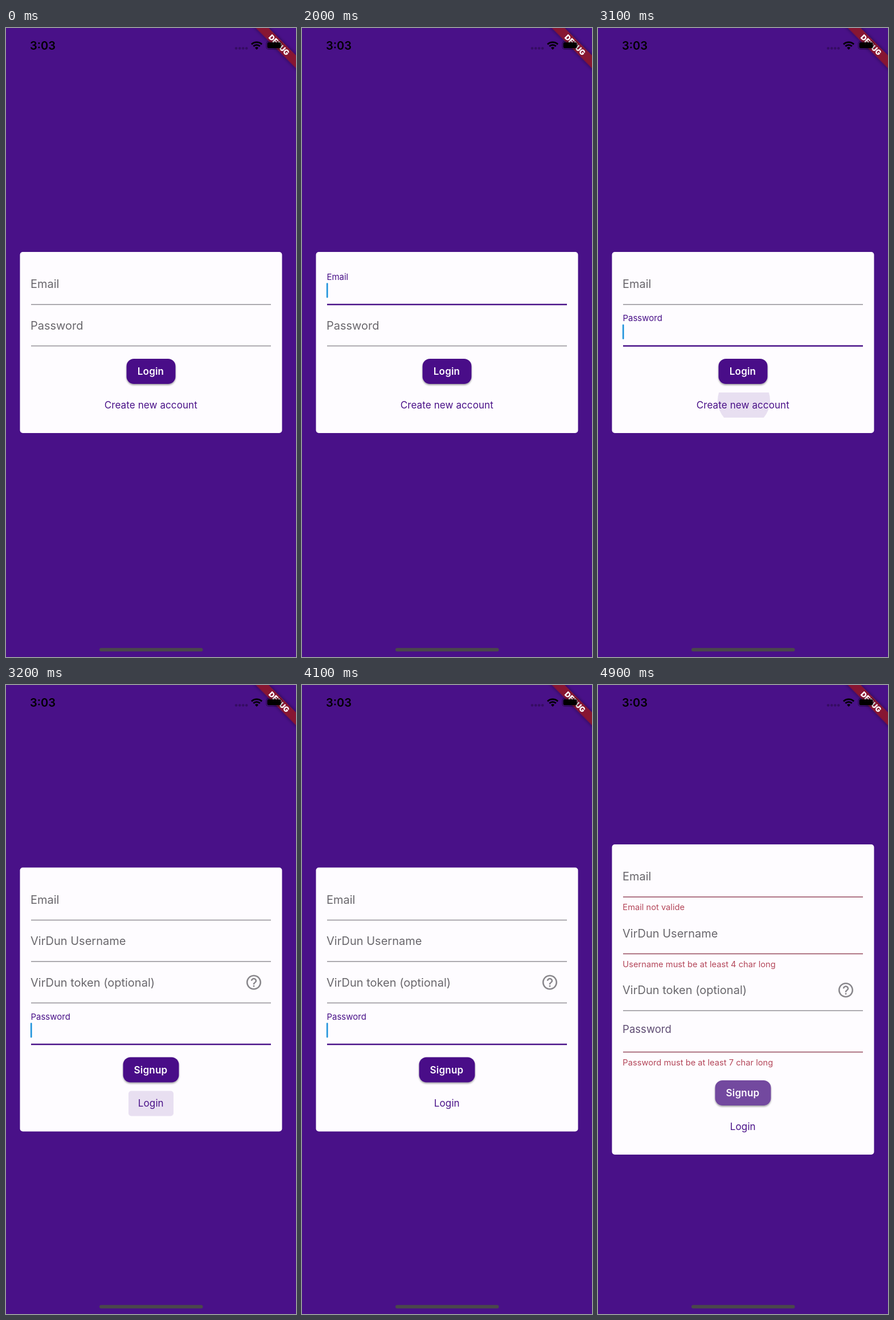
Write an HTML page that moves like this. It is 509 px wide and 1101 px high and loops after 5 s.

```html
<!DOCTYPE html>
<html lang="en">
<head>
<meta charset="utf-8">
<title>Login form</title>
<style>
  html, body { margin: 0; width: 100%; height: 100%; overflow: hidden; background: #491188; }
  svg { display: block; width: 100%; height: 100%; }
  text { font-family: Inter, "Open Sans", sans-serif; }
  .label { font-size: 20px; }
  .button { font-size: 17px; font-weight: 600; letter-spacing: .2px; text-anchor: middle; fill: #fefcff; }
  .link { font-size: 17px; letter-spacing: .1px; text-anchor: middle; fill: #491188; }
  .error { font-size: 14.7px; fill: #b4475a; }
</style>
</head>
<body>
<svg viewBox="0 0 509 1101">
  <defs>
    <filter id="drop" x="-20%" y="-20%" width="140%" height="160%">
      <feDropShadow dx="0" dy="2" stdDeviation="1.6" flood-color="#000" flood-opacity=".38"/>
    </filter>
    <filter id="glow" x="-20%" y="-100%" width="140%" height="300%">
      <feDropShadow dx="0" dy="0" stdDeviation="3" flood-color="#000" flood-opacity=".5"/>
    </filter>
    <clipPath id="linkClip"><rect x="160" y="638" width="189" height="44" rx="5"/></clipPath>
    <clipPath id="buttonClip"><rect x="205.5" y="651.5" width="98" height="44" rx="13"/></clipPath>
  </defs>
  <rect width="509" height="1101" fill="#491188"/>
  <g id="form"></g>

  <g transform="translate(509 0) rotate(45)">
    <rect x="-60" y="34" width="120" height="15.7" fill="#871333" filter="url(#glow)"/>
    <text y="46.6" font-size="13" font-weight="900" fill="#fff" text-anchor="middle">DEBUG</text>
  </g>

  <text x="42" y="37.8" font-size="20" font-weight="600">3:03</text>
  <g fill="#000" fill-opacity=".27">
    <circle cx="404" cy="35.5" r="2.3"/><circle cx="410.2" cy="35.5" r="2.3"/>
    <circle cx="416.2" cy="35.5" r="2.3"/><circle cx="422.2" cy="35.5" r="2.3"/>
  </g>
  <g fill="none" stroke="#000" stroke-width="2.9">
    <path d="M431 28.6A12.8 12.8 0 0 1 449 28.6"/>
    <path d="M434.3 32A8 8 0 0 1 445.7 32"/>
    <path d="M440 38L437 34.8A4.3 4.3 0 0 1 443 34.8Z" fill="#000" stroke="none"/>
  </g>
  <rect x="456.8" y="23.3" width="27.6" height="14" rx="4.3" fill="none" stroke="#000" stroke-opacity=".4" stroke-width="1.2"/>
  <rect x="458.5" y="25" width="24.2" height="10.6" rx="2.8"/>
  <path d="M486 28Q488.4 30.3 486 32.7Z" fill-opacity=".4"/>
  <rect x="164" y="1085.3" width="181.5" height="6" rx="3" fill="#4a484b"/>
</svg>
<script>
const LOOP = 5000, STEP = 100;
const PURPLE = [73, 17, 136], LABEL = [105, 103, 108], LINE = [146, 144, 150];
const ERROR_LINE = 'rgb(148,72,92)';
const HELP = 'M11 18h2v-2h-2v2zm1-16C6.48 2 2 6.48 2 12s4.48 10 10 10 10-4.48 10-10S17.52 2 12 2z' +
  'm0 18c-4.41 0-8-3.59-8-8s3.59-8 8-8 8 3.59 8 8-3.59 8-8 8z' +
  'm0-14c-2.21 0-4 1.79-4 4h2c0-1.1.9-2 2-2s2 .9 2 2c0 2-3 1.75-3 5h2c0-2.25 3-2.5 3-5 0-2.21-1.79-4-4-4z';

// Key moments in ms
const EMAIL_FOCUS = 1810, PASSWORD_FOCUS = 2720, TAP_CREATE = 3100,
  SIGNUP = 3200, TAP_SIGNUP = 4800, SUBMIT = 4810;

const form = document.getElementById('form');
const clamp = x => Math.min(1, Math.max(0, x));
const lerp = (a, b, k) => a + (b - a) * k;
const mix = (a, b, k) => `rgb(${a.map((v, i) => Math.round(lerp(v, b[i], k)))})`;

// Fast-out, slow-in curve: cubic-bezier(.4, 0, .2, 1)
function ease(x) {
  if (x <= 0 || x >= 1) return clamp(x);
  let lo = 0, hi = 1;
  for (let i = 0; i < 20; i++) {
    const s = (lo + hi) / 2, r = 1 - s;
    if (1.2 * r * r * s + .6 * r * s * s + s ** 3 < x) lo = s; else hi = s;
  }
  return 3 * (1 - lo) * lo * lo + lo ** 3;
}

const focusLevel = (t, from, to) => ease((t - from) / 200) - ease((t - to) / 200);

// Caret holds for 650 ms, then fades out and in every 500 ms
function caretOpacity(t, from, to) {
  if (t < from || t >= to) return 0;
  const age = t - from - 650;
  if (age < 0) return 1;
  const k = 1 - (1 - clamp(age % 500 / 250)) ** 1.7;
  return Math.floor(age / 500) % 2 ? k : 1 - k;
}

function field(name, y, { focus = 0, caret = 0, error = '', help = false } = {}) {
  const width = error ? 1.6 : lerp(1.3, 2.7, focus);
  const stroke = error ? ERROR_LINE : mix(LINE, PURPLE, focus);
  let out = `<text class="label" fill="${mix(LABEL, PURPLE, focus)}"
    transform="translate(${lerp(43, 43.4, focus)} ${y - lerp(29, 43.2, focus)}) scale(${lerp(1, .75, focus)})">${name}</text>
    <path d="M44 ${y}H465" stroke="${stroke}" stroke-width="${width}"/>`;
  if (caret) out += `<rect x="42.9" y="${y - 37.8}" width="2.7" height="26.2" rx="1.3" fill="#2094dc" opacity="${caret}"/>`;
  if (error) out += `<text class="error" x="43.3" y="${y + 23}">${error}</text>`;
  if (help) out += `<path transform="translate(419.3 ${y - 51.7}) scale(1.305)" fill="#89878c" d="${HELP}"/>`;
  return out;
}

const card = (top, bottom) =>
  `<rect x="24.5" y="${top}" width="460" height="${bottom - top}" rx="5" fill="#fefcff"/>`;

const button = (name, y, width, color = '#491188') =>
  `<rect x="${254.5 - width / 2}" y="${y}" width="${width}" height="44" rx="13" fill="${color}" filter="url(#drop)"/>`;

const buttonText = (name, y) => `<text class="button" x="254" y="${y + 28}">${name}</text>`;
const linkText = (name, y) => `<text class="link" x="254.3" y="${y + 27.6}">${name}</text>`;

function loginForm(t) {
  const ripple = t >= TAP_CREATE
    ? '<circle cx="256" cy="652" r="46" fill="#491188" opacity=".12" clip-path="url(#linkClip)"/>' : '';
  return card(392, 709) +
    field('Email', 484, {
      focus: focusLevel(t, EMAIL_FOCUS, PASSWORD_FOCUS),
      caret: caretOpacity(t, EMAIL_FOCUS, PASSWORD_FOCUS)
    }) +
    field('Password', 556.5, {
      focus: focusLevel(t, PASSWORD_FOCUS, SUBMIT),
      caret: caretOpacity(t, PASSWORD_FOCUS, SUBMIT)
    }) +
    button('Login', 579, 86) + buttonText('Login', 579) +
    ripple + linkText('Create new account', 638);
}

function signupForm(t) {
  const bad = t >= SUBMIT;
  const lines = bad ? [371, 470.5, 570, 642.5] : [411.5, 484, 556.5, 629];
  const top = bad ? 692 : 651.5, link = top + 59;
  const glow = .12 * clamp(1 - (t - SIGNUP) / 375) ** 1.2;
  const ripple = t >= TAP_SIGNUP && !bad
    ? '<circle cx="254.5" cy="673.5" r="27" fill="#fff" opacity=".22" clip-path="url(#buttonClip)"/>' : '';
  return (bad ? card(279, 822) : card(319.5, 781.5)) +
    field('Email', lines[0], { error: bad && 'Email not valide' }) +
    field('VirDun Username', lines[1], { error: bad && 'Username must be at least 4 char long' }) +
    field('VirDun token (optional)', lines[2], { help: true }) +
    field('Password', lines[3], {
      focus: focusLevel(t, PASSWORD_FOCUS, SUBMIT),
      caret: caretOpacity(t, PASSWORD_FOCUS, SUBMIT),
      error: bad && 'Password must be at least 7 char long'
    }) +
    button('Signup', top, 98, bad ? '#734a9f' : '#491188') + ripple + buttonText('Signup', top) +
    `<rect x="215" y="${link}" width="79" height="44" rx="5" fill="#491188" opacity="${glow}"/>` +
    linkText('Login', link);
}

let shown = -1;
function draw(now) {
  const t = Math.floor(now % LOOP / STEP) * STEP;
  if (t !== shown) {
    form.innerHTML = t < SIGNUP ? loginForm(t) : signupForm(t);
    shown = t;
  }
}

const start = performance.now();
function tick() {
  draw(performance.now() - start);
  requestAnimationFrame(tick);
}
tick();
</script>
</body>
</html>
```
